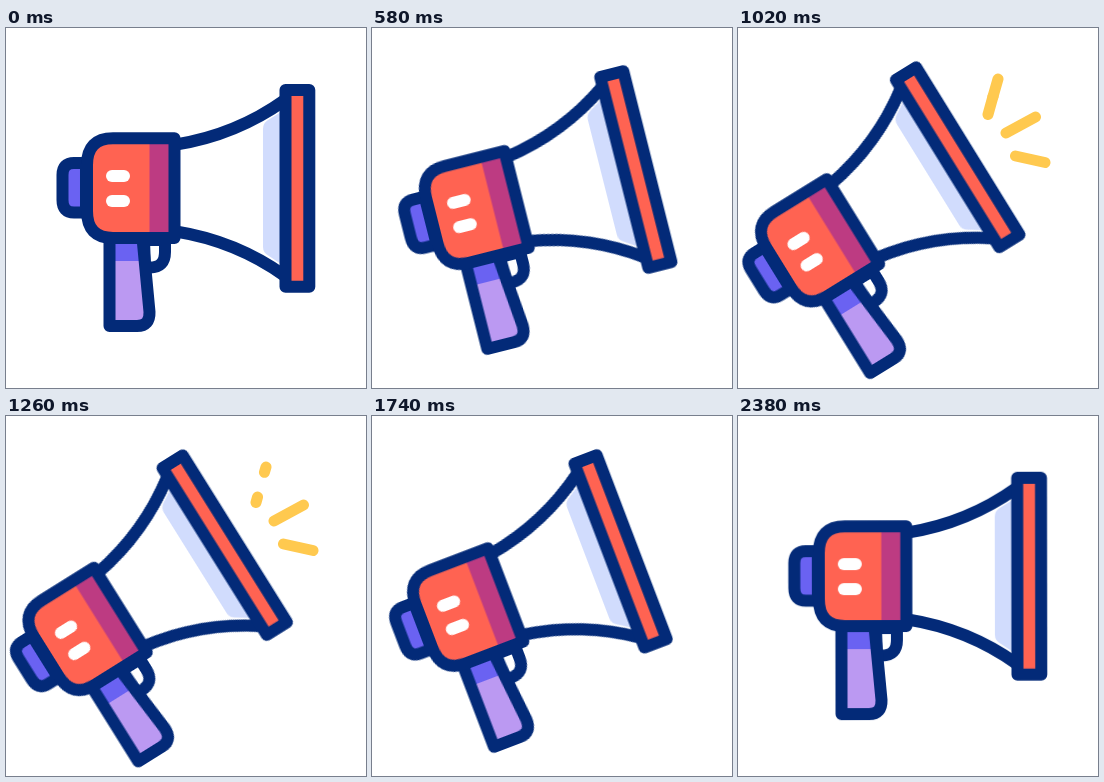
An HTML page that plays this animation: 360 by 360 pixels, repeating every 2400 ms.

```html
<!DOCTYPE html>
<html lang="en">
<head>
<meta charset="utf-8">
<title>Megaphone</title>
<style>
  html, body { margin: 0; width: 100%; height: 100%; overflow: hidden; background: #fff; }
  svg { display: block; width: 100%; height: 100%; }

  .line { stroke: #032a78; stroke-width: 12; stroke-linecap: round; stroke-linejoin: round; }
  .red { fill: #ff6352; }
  .violet { fill: #6a62f2; }

  .drift { animation: drift 2.4s ease-in-out infinite; }
  @keyframes drift {
    0%, 13.33%, 48.33%, 51.67%, 86.67%, 100% { transform: translateX(0); }
    27.5%, 72.5% { transform: translateX(2.7px); }
    34%, 66% { transform: translateX(.7px); }
  }

  .horn { transform-origin: 200.6px 271.5px; animation: swing 2.4s infinite; }
  @keyframes swing {
    0% { transform: rotate(0deg); animation-timing-function: linear; }
    13.33% { transform: rotate(-1.4deg); animation-timing-function: cubic-bezier(.45, .05, .7, .82); }
    32.29% { transform: rotate(-28.2deg); animation-timing-function: cubic-bezier(.15, .45, .4, 1); }
    48.33% { transform: rotate(-32deg); animation-timing-function: linear; }
    51.67% { transform: rotate(-32deg); animation-timing-function: cubic-bezier(.6, 0, .85, .55); }
    67.71% { transform: rotate(-28.2deg); animation-timing-function: cubic-bezier(.3, .18, .55, .95); }
    86.67% { transform: rotate(-1.4deg); animation-timing-function: linear; }
    100% { transform: rotate(0deg); }
  }

  .marks path {
    fill: none; stroke: #ffc94f; stroke-width: 11; stroke-linecap: round;
    stroke-dasharray: 1 3; stroke-dashoffset: 1; opacity: 0;
    animation: 2.4s linear infinite;
  }
  .marks .low { animation-name: low; }
  .marks .mid { animation-name: mid; }
  .marks .top { animation-name: top; }
  @keyframes low {
    0%, 28.74% { stroke-dashoffset: 1; opacity: 0; }
    28.75% { stroke-dashoffset: 1; opacity: 1; }
    32.9%, 59.2% { stroke-dashoffset: 0; opacity: 1; }
    63.3% { stroke-dashoffset: 1; opacity: 1; }
    63.31%, 100% { stroke-dashoffset: 1; opacity: 0; }
  }
  @keyframes mid {
    0%, 31.89% { stroke-dashoffset: 1; opacity: 0; }
    31.9% { stroke-dashoffset: 1; opacity: 1; }
    35%, 55% { stroke-dashoffset: 0; opacity: 1; }
    59.2% { stroke-dashoffset: 1; opacity: 1; }
    59.21%, 100% { stroke-dashoffset: 1; opacity: 0; }
  }
  @keyframes top {
    0%, 35.79% { stroke-dashoffset: 1; opacity: 0; }
    35.8% { stroke-dashoffset: 1; opacity: 1; }
    39.6%, 49.8% { stroke-dashoffset: 0; opacity: 1; }
    53.75% { stroke-dashoffset: 1; opacity: 1; }
    53.76%, 100% { stroke-dashoffset: 1; opacity: 0; }
  }
</style>
</head>
<body>
<svg viewBox="0 0 360 360">
  <g class="drift">
    <g class="horn">
      <!-- trigger -->
      <path class="line" fill="#fff" d="M138 212H159V224Q159 239.5 144 239.5H139Z"/>

      <!-- handle -->
      <path fill="#bb99f2" d="M103.5 210H136.5L143.5 284Q144 298 131 298H103.5Z"/>
      <path class="violet" d="M103.5 210H136.5L138.7 233H103.5Z"/>
      <path class="line" fill="none" d="M103.5 210H136.5L143.5 284Q144 298 131 298H103.5Z"/>

      <!-- back cap -->
      <path class="line violet" d="M80 135H68Q56.5 135 56.5 147V172Q56.5 184.5 68 184.5H80Z"/>

      <!-- cone -->
      <path fill="#fff" d="M170 116.5Q230 107 279 72V248Q230 213 170 203.5Z"/>
      <path fill="#d1dcfd" d="M257 101Q257 95 262 92L275 84V236L263 228Q257 225 257 219Z"/>
      <path class="line" fill="none" d="M170 116.5Q230 107 279 72M170 203.5Q230 213 279 248"/>

      <!-- body -->
      <path class="red" d="M168.5 110.3H107Q81 110.3 81 137V183Q81 210 107 210H168.5Z"/>
      <path fill="#bd3b82" d="M143.5 110.3H168.5V210H143.5Z"/>
      <path class="line" fill="none" d="M168.5 110.3H107Q81 110.3 81 137V183Q81 210 107 210H168.5Z"/>
      <rect x="100" y="142" width="24" height="12" rx="6" fill="#fff"/>
      <rect x="100" y="167" width="24" height="12" rx="6" fill="#fff"/>

      <!-- front rim -->
      <rect class="line red" x="279.5" y="62" width="23.8" height="196.7"/>
    </g>
  </g>

  <g class="marks">
    <path class="low" pathLength="1" d="M277.5 128L307 134.5"/>
    <path class="mid" pathLength="1" d="M268 105L297.5 89"/>
    <path class="top" pathLength="1" d="M250 86.5L255 68.5"/>
    <path class="top" pathLength="1" d="M260 51L255 68.5"/>
  </g>
</svg>
</body>
</html>
```
